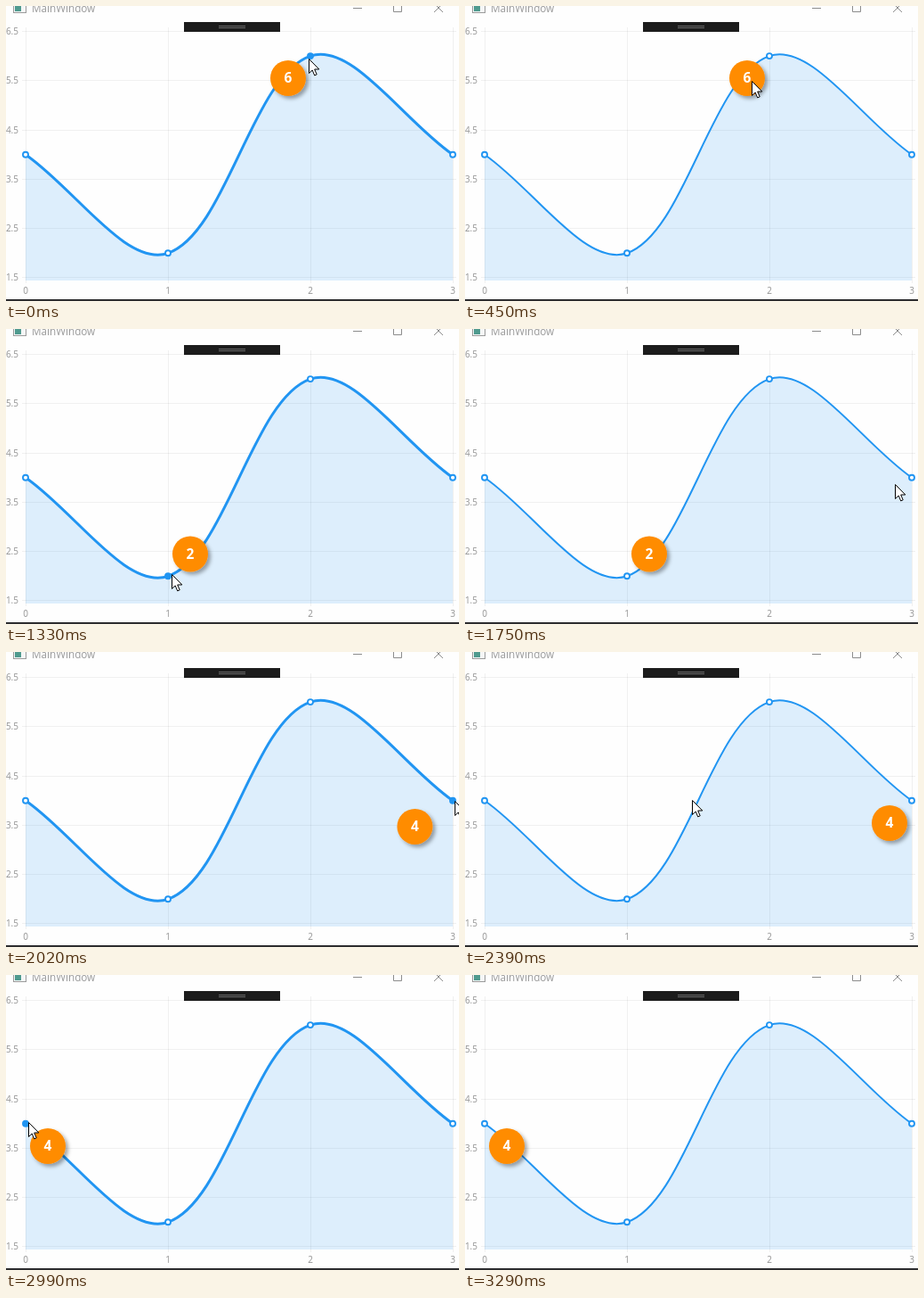
Write an HTML page that moves like this. It is 509 px wide and 331 px high and loops after 3730 ms.

```html
<!DOCTYPE html>
<html lang="en">
<head>
<meta charset="utf-8">
<title>Line chart</title>
<style>
  html, body { margin: 0; width: 100%; height: 100%; overflow: hidden; background: #fefefe; }
  svg { display: block; width: 509px; height: 331px; font-family: "Open Sans", "Noto Sans", sans-serif; }
  .label { font-size: 10px; fill: #929292; }
  .grid { stroke: #000; stroke-opacity: .055; fill: none; }
</style>
</head>
<body>
<svg viewBox="0 0 509 331">
  <defs>
    <filter id="shadow" x="-30%" y="-30%" width="170%" height="170%">
      <feDropShadow dx="3" dy="3" stdDeviation="2" flood-color="#000" flood-opacity=".35"/>
    </filter>
  </defs>
  <rect width="509" height="331" fill="#fefefe"/>

  <g id="titleBar">
    <rect x="8.5" y="-5.5" width="14" height="13" fill="#f4f6f6" stroke="#9a9a9a"/>
    <rect x="10" y="-2" width="7" height="8" fill="#4f9a8e"/>
    <text x="29" y="7" font-size="11.7" fill="#999">MainWindow</text>
    <path d="M390 2.5H400M435.5 -3.5H444.5V6.5H435.5ZM481 -3L491 7M491 -3L481 7" fill="none" stroke="#8c8c8c"/>
  </g>

  <g id="axes"></g>
  <path id="area" fill="#2195f2" fill-opacity=".15"/>
  <path id="line" fill="none" stroke="#2195f2"/>
  <g id="markers" stroke="#2195f2" stroke-width="1.9"></g>

  <rect x="200" y="18" width="108" height="11" fill="#1c1c1c"/>
  <path d="M239 22.5H269M239 24.5H269" stroke="#6a6a6a"/>
  <rect y="329" width="509" height="2" fill="#2c2c2e"/>

  <g id="tooltip">
    <circle r="20" fill="#ff8c00" filter="url(#shadow)"/>
    <text id="value" y="5" font-size="15.5" font-weight="700" fill="#fff" text-anchor="middle"></text>
  </g>
  <path id="cursor" d="M.5 .5V16.5L4.2 13L6.7 18.9L9.2 17.8L6.7 12H11.8Z" fill="#fff" stroke="#000"/>
</svg>
<script>
const NS = "http://www.w3.org/2000/svg";
const LOOP = 3730;
const SMOOTHNESS = 0.7;
const values = [4, 2, 6, 4];
const $ = id => document.getElementById(id);

const toX = i => 22 + 160 * i;
const toY = v => 387.9 - 55.3 * v;
const points = values.map((v, i) => [toX(i), toY(v)]);

function add(parent, tag, attrs, text) {
  const node = document.createElementNS(NS, tag);
  for (const key in attrs) node.setAttribute(key, attrs[key]);
  if (text !== undefined) node.textContent = text;
  return parent.appendChild(node);
}

const mix = (a, b, k) => a.map((v, i) => v + (b[i] - v) * k);
const span = (t, from, to) => Math.min(1, Math.max(0, (t - from) / (to - from)));
const smooth = k => k * k * (3 - 2 * k);

// Control points on both sides of point i, parallel to the line between segment midpoints.
function handles(i) {
  const p = points[i], prev = points[i - 1] || p, next = points[i + 1] || p;
  const before = Math.hypot(p[0] - prev[0], p[1] - prev[1]);
  const after = Math.hypot(next[0] - p[0], next[1] - p[1]);
  const midIn = mix(prev, p, 0.5), midOut = mix(p, next, 0.5);
  const anchor = mix(midIn, midOut, before / (before + after));
  return [midIn, midOut].map(mid => p.map((v, axis) => v + (mid[axis] - anchor[axis]) * SMOOTHNESS));
}

function buildChart() {
  for (let v = 1.5; v <= 6.5; v++) {
    const y = Math.floor(toY(v)) + 0.5;
    add($("axes"), "path", { class: "grid", d: `M18 ${y}H506` });
    add($("axes"), "text", { class: "label", x: 14, y: y + 3.5, "text-anchor": "end" }, v.toFixed(1));
  }
  points.forEach(([x, y], i) => {
    add($("axes"), "path", { class: "grid", d: `M${x + 0.5} 24V311` });
    add($("axes"), "text", { class: "label", x, y: 323, "text-anchor": "middle" }, i);
    add($("markers"), "circle", { cx: x, cy: y, r: 3 });
  });
  let d = `M${points[0]}`;
  for (let i = 1; i < points.length; i++) d += `C${handles(i - 1)[1]} ${handles(i)[0]} ${points[i]}`;
  $("line").setAttribute("d", d);
  $("area").setAttribute("d", `${d}V308H22Z`);
}

const hovers = [
  { point: 2, from: 0, to: 395 },
  { point: 1, from: 940, to: 1390 },
  { point: 3, from: 1834, to: 2125 },
  { point: 0, from: 2684, to: 3050 }
];

const tooltipMoves = [
  { from: -1, to: 0, at: [317, 81], value: 6 },
  { from: 940, to: 1140, at: [207, 252.5], value: 2 },
  { from: 1834, to: 2034, at: [477, 192], value: 4 },
  { from: 2684, to: 2860, at: [47, 192], value: 4 }
];

const cursorStart = [340, 59];
const cursorMoves = [
  { from: 340, to: 872, at: [181, 279], ease: smooth },
  { from: 950, to: 1150, at: [186, 275], ease: smooth },
  { from: 1330, to: 1830, at: [504, 167], ease: smooth },
  { from: 2050, to: 2715, at: [25, 165], ease: smooth },
  { from: 2990, to: 3290, at: [45, 336], ease: k => k * k }
];

const follow = (moves, start, t) =>
  moves.reduce((pos, m) => mix(pos, m.at, (m.ease || (k => k))(span(t, m.from, m.to))), start);

const place = (node, [x, y]) => node.setAttribute("transform", `translate(${x} ${y})`);

function render(t) {
  const hover = hovers.find(h => t >= h.from && t < h.to);
  $("line").setAttribute("stroke-width", hover ? 3 : 2);
  [...$("markers").children].forEach((marker, i) =>
    marker.setAttribute("fill", hover && hover.point === i ? "#2195f2" : "#fff"));

  place($("tooltip"), follow(tooltipMoves, tooltipMoves[0].at, t));
  $("value").textContent = tooltipMoves.filter(m => t >= m.from).pop().value;
  place($("cursor"), follow(cursorMoves, cursorStart, t).map(Math.round));
}

buildChart();
const started = performance.now();
function tick() {
  render((performance.now() - started) % LOOP);
  requestAnimationFrame(tick);
}
tick();
</script>
</body>
</html>
```
